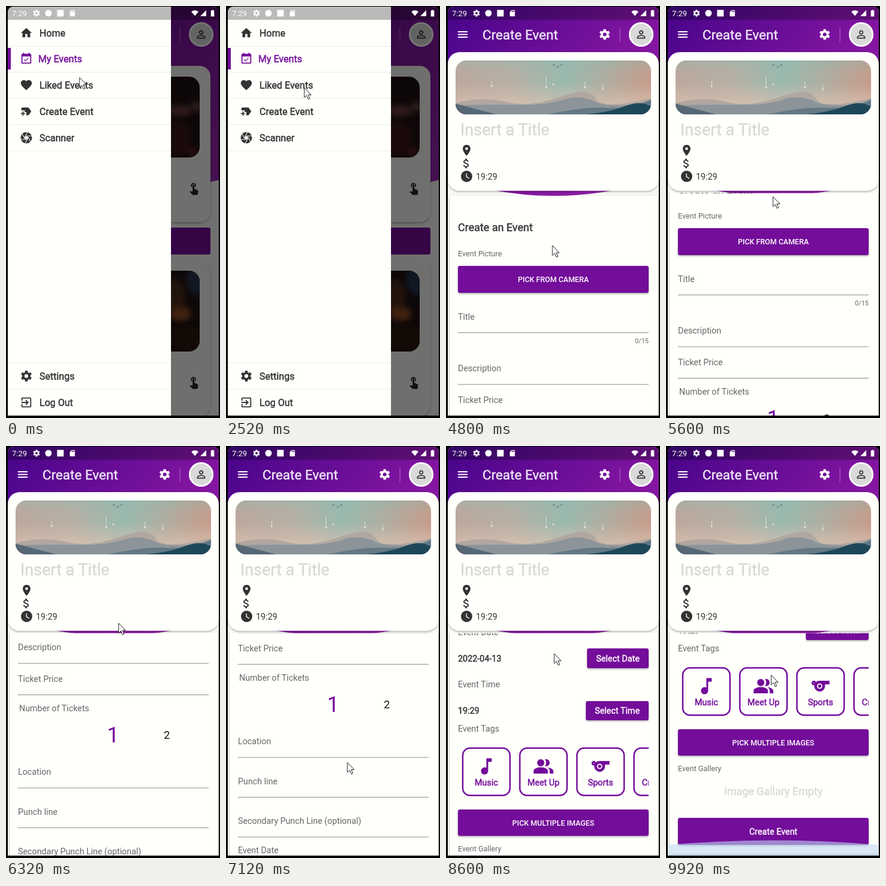
Animation, 358 px wide and 688 px high, one loop 10000 ms. Source, as an HTML page:

```html
<!DOCTYPE html>
<html lang="en">
<head>
<meta charset="utf-8">
<title>Create Event</title>
<style>
html, body { margin: 0; width: 100%; height: 100%; overflow: hidden; background: #000; }
svg { display: block; width: 358px; height: 688px; font-family: Roboto, Arial, sans-serif; }
.b { stroke-width: .45px; }
.m { font-weight: 500; }
</style>
</head>
<body>
<script>
const WHITE = '#fffffc', PURPLE = '#730b9a', DARK = '#333', GREY = '#666', PALE = '#d8d9d5';

const ICONS = {
  home: 'M10 20v-6h4v6h5v-8h3L12 3 2 12h3v8z',
  event: 'M16.5 11L15.5 10l-4.9 4.9-2.1-2.1-1.1 1 3.2 3.2zM19 3h-1V1h-2v2H8V1H6v2H5c-1.1 0-2 .9-2 2v14c0 1.1.9 2 2 2h14c1.1 0 2-.9 2-2V5c0-1.1-.9-2-2-2zm0 16H5V8h14z',
  heart: 'M12 21.4l-1.5-1.4C5.4 15.4 2 12.3 2 8.5 2 5.4 4.4 3 7.5 3c1.7 0 3.4.8 4.5 2.1C13.1 3.8 14.8 3 16.5 3 19.6 3 22 5.4 22 8.5c0 3.8-3.4 6.9-8.5 11.5z',
  label: 'M21 12l-4.4 6.2c-.4.5-1 .8-1.6.8h-3v-6H9v-3H3V7c0-1.1.9-2 2-2h10c.7 0 1.3.3 1.6.8zM10 15H7v-3H5v3H2v2h3v3h2v-3h3z',
  exit: 'M10.1 15.6L11.5 17l5-5-5-5-1.4 1.4L12.7 11H3v2h9.7zM19 3H5c-1.1 0-2 .9-2 2v4h2V5h14v14H5v-4H3v4c0 1.1.9 2 2 2h14c1.1 0 2-.9 2-2V5c0-1.1-.9-2-2-2z',
  touch: 'M9 11.2V7.5C9 6.1 10.1 5 11.5 5S14 6.1 14 7.5v3.7c1.2-.8 2-2.2 2-3.7C16 5 14 3 11.5 3S7 5 7 7.5c0 1.6.8 2.9 2 3.7zm9.8 4.7l-4.5-2.3-.5-.1H13v-6c0-.8-.7-1.5-1.5-1.5S10 6.7 10 7.5v10.7l-3.7-.7-1.5 1.1 4.9 5c.3.3.7.4 1.1.4h6.8c.7 0 1.3-.5 1.4-1.3l.8-5.2c0-.8-.4-1.4-1-1.6z',
  person: 'M12 5.9a2.1 2.1 0 1 1 0 4.2 2.1 2.1 0 0 1 0-4.2m0 9c3 0 6.1 1.5 6.1 2.1v1.1H5.9V17c0-.6 3.1-2.1 6.1-2.1M12 4a4 4 0 1 0 0 8 4 4 0 0 0 0-8zm0 9c-2.7 0-8 1.3-8 4v3h16v-3c0-2.7-5.3-4-8-4z',
  menu: 'M3 18h18v-2H3zm0-5h18v-2H3zm0-7v2h18V6z',
  place: 'M12 2C8.1 2 5 5.1 5 9c0 5.2 7 13 7 13s7-7.8 7-13c0-3.9-3.1-7-7-7zm0 4.5a2.5 2.5 0 1 1 0 5 2.5 2.5 0 0 1 0-5z',
  money: 'M11.8 10.9c-2.3-.6-3-1.2-3-2.1 0-1.1 1-1.9 2.7-1.9 1.8 0 2.4.9 2.5 2.1h2.2c-.1-1.7-1.1-3.3-3.2-3.8V3h-3v2.2c-1.9.4-3.5 1.7-3.5 3.6 0 2.3 1.9 3.4 4.7 4.1 2.5.6 3 1.5 3 2.4 0 .7-.5 1.8-2.7 1.8-2.1 0-2.9-.9-3-2.1H6.3c.1 2.2 1.8 3.4 3.7 3.8V21h3v-2.1c1.9-.4 3.5-1.5 3.5-3.6 0-2.8-2.4-3.8-4.7-4.4z',
  clock: 'M12 2a10 10 0 1 0 0 20 10 10 0 0 0 0-20zm4.2 14.2L11 13V7h1.5v5.2l4.5 2.7z',
  music: 'M12 3v10.6A4 4 0 1 0 14 17V7h4V3z',
  people: 'M16.7 13.1C18 14 19 15.3 19 17v3h4v-3c0-2.2-3.6-3.5-6.3-3.9zM15 12a4 4 0 1 0-1.3-7.8c.8 1.1 1.3 2.4 1.3 3.8s-.5 2.7-1.3 3.8zM9 12a4 4 0 1 0 0-8 4 4 0 0 0 0 8zm0 1c-2.7 0-8 1.3-8 4v3h16v-3c0-2.7-5.3-4-8-4z',
  whistle: 'M11.2 6c-1.7 0-3.2.7-4.3 1.7A2.5 2.5 0 1 0 5.1 10.9 6.2 6.2 0 0 0 11.7 18c2.5-.3 4.7-2.3 5.2-4.8.1-.7.1-1.4 0-2.1 0-.6.4-1.1 1-1.1H22V6zM4.5 8a.5.5 0 1 1 0 1 .5.5 0 0 1 0-1zM11 9a3 3 0 1 1 0 6 3 3 0 0 1 0-6zm0 1.2a1.8 1.8 0 1 0 0 3.6 1.8 1.8 0 0 0 0-3.6z',
  card: 'M18 2h-8L4 8v12c0 1.1.9 2 2 2h12c1.1 0 2-.9 2-2V4c0-1.1-.9-2-2-2zm-6 6h-2V4h2zm3 0h-2V4h2zm3 0h-2V4h2z',
  wifi: 'M12 21L0 7Q12-2 24 7z',
  signal: 'M2 22h20V2z',
  battery: 'M7 4h3V2h4v2h3v18H7z'
};

const rect = (x, y, w, h, fill, more = '') =>
  `<rect x="${x}" y="${y}" width="${w}" height="${h}" fill="${fill}" ${more}/>`;
const path = (d, fill, more = '') => `<path d="${d}" fill="${fill}" ${more}/>`;
const text = (x, y, size, str, fill = GREY, cls = '', anchor = 'start') =>
  `<text x="${x}" y="${y}" font-size="${size}" fill="${fill}" class="${cls}" text-anchor="${anchor}"` +
  `${cls == 'b' ? ` stroke="${fill}"` : ''}>${str}</text>`;
const at = (cx, cy, scale, body) =>
  `<g transform="translate(${cx} ${cy}) scale(${scale}) translate(-12 -12)">${body}</g>`;
const icon = (name, cx, cy, fill, scale = .92) =>
  at(cx, cy, scale, path(ICONS[name], fill, 'fill-rule="evenodd"'));
const spokes = (d, stroke, width) => [0, 1, 2, 3, 4, 5].map(k =>
  `<path d="${d}" stroke="${stroke}" stroke-width="${width}" transform="rotate(${k * 60} 12 12)"/>`).join('');
const gear = (cx, cy, fill, scale) => at(cx, cy, scale,
  `<circle cx="12" cy="12" r="5.4" fill="none" stroke="${fill}" stroke-width="4"/>` + spokes('M12 6V2.2', fill, 4.8));
const aperture = (cx, cy) => at(cx, cy, .95,
  `<circle cx="12" cy="12" r="10" fill="${DARK}"/>` +
  path('M9.3 10.4L12 9l2.7 1.4v3.2L12 15l-2.7-1.4z', WHITE) + spokes('M9.2 10.6L14.9.7', WHITE, 1.1));
const button = (x, y, w, h, label, size, cls) =>
  rect(x, y, w, h, PURPLE, 'rx="3" filter="url(#low)"') +
  text(x + w / 2, y + h / 2 + size * .36, size, label, '#fff', cls, 'middle');
const line = y => rect(20, y - .5, 319, 1, '#8b8b89');

function statusBar() {
  return rect(0, 0, 358, 23, '#000', 'opacity=".27"') + text(10, 17, 13, '7:29', '#fff') +
    gear(51, 12, '#fff', .58) + '<circle cx="71" cy="12" r="5.5" fill="#fff"/>' +
    rect(85.5, 6.5, 11, 11, '#fff') + icon('card', 111, 12, '#fff', .53) +
    icon('wifi', 316, 12, '#fff', .5) + icon('signal', 330, 12, '#fff', .5) + icon('battery', 345.5, 12, '#fff', .56);
}

const barEnd = () => rect(290.5, 36, 1, 24, '#fff', 'opacity=".4"') +
  '<circle cx="326.5" cy="47.5" r="19.2" fill="#d9d9d9" stroke="#fff" stroke-width="2.8"/>' +
  icon('person', 326.5, 47.5, DARK, .88);

function eventsPage() {
  const card = (y, spots) => rect(16, y, 326, 261, '#f3f3f1', 'rx="18" filter="url(#low)"') +
    `<g clip-path="url(#photo)" transform="translate(0 ${y - 100})">` + rect(34, 118, 290, 135, '#1c1012') +
    spots.map(([x, cy, rx, ry, c]) =>
      `<ellipse cx="${x}" cy="${cy}" rx="${rx}" ry="${ry}" fill="${c}" filter="url(#soft)"/>`).join('') +
    '</g>' + icon('touch', 314, y + 204, '#222', .95);
  return rect(0, 0, 358, 688, '#f6f6f4') + path('M0 0H358V290Q310 303 180 317 60 317 0 300z', 'url(#bar)') + barEnd() +
    card(100, [[290, 175, 22, 9, '#6b3b3b'], [318, 168, 8, 8, '#6d4746'], [285, 220, 26, 30, '#3a1713'],
      [312, 244, 8, 8, '#5a2420']]) +
    rect(16, 370, 326, 45, PURPLE, 'rx="3"') +
    card(424, [[320, 135, 18, 24, '#25364d'], [282, 160, 18, 28, '#4c2a1c'], [292, 190, 18, 12, '#8c4a22'],
      [304, 230, 40, 20, '#2c1411']]);
}

function drawer() {
  const item = (y, label, pic) => pic + text(56, y + 6, 16.1, label, DARK, 'b');
  return rect(0, 0, 276, 688, WHITE) +
    [67, 110, 153.5, 197.5, 241.5, 595.5, 639.5].map(y => rect(3, y, 273, 1, '#e9eae6')).join('') +
    rect(3, 70, 5, 36, PURPLE) +
    item(45, 'Home', icon('home', 34, 45, DARK)) +
    icon('event', 34, 88, PURPLE) + text(54, 94, 16.1, 'My Events', PURPLE, 'b') +
    item(131.5, 'Liked Events', icon('heart', 34, 132, DARK)) +
    item(175.5, 'Create Event', icon('label', 34, 176, DARK)) +
    item(219.5, 'Scanner', aperture(34, 220)) +
    item(618, 'Settings', gear(34, 618, DARK, .92)) +
    item(662, 'Log Out', icon('exit', 34, 662, DARK));
}

function landscape() {
  const ray = (x, y, h) => rect(x, y, 1, h, '#fff', 'opacity=".55"') +
    `<circle cx="${x + .5}" cy="${y + h}" r="1.3" fill="#fff" opacity=".8"/>`;
  return '<g clip-path="url(#banner)">' + rect(16, 91, 327, 90, 'url(#sky)') + rect(16, 91, 327, 90, 'url(#haze)') +
    path('M16 162Q60 150 100 160T190 152 250 154 343 154V181H16z', '#b0a7a1') +
    path('M16 166Q70 164 120 165T200 155Q225 148 250 160T343 160V181H16z', '#8c9499') +
    path('M16 163Q50 172 84 181H16z', '#566775') +
    path('M170 181Q230 168 270 170T343 156V181z', '#637884') +
    path('M235 181Q275 177 300 167T343 168V181z', '#1d4859') +
    ray(76, 125, 9) + ray(167, 118, 18) + ray(179, 129, 2) + ray(232, 126, 10) + ray(262, 132, 7) +
    path('M178 98l2 1 2-1M185 101l2 1 2-1M191 98l2 1 2-1', 'none', 'stroke="#456" stroke-width=".8"') + '</g>';
}

function form() {
  const field = (y, label, lineY, x = 20) => text(x, y, 14.3, label) + (lineY ? line(lineY) : '');
  const tag = (x, label, name) =>
    rect(x, 1188.5, 79, 79, 'none', `rx="12" stroke="${PURPLE}" stroke-width="2.5"`) +
    (name ? icon(name, x + 39.5, 1219, PURPLE, 1.5) : '') +
    text(x + 39.5, 1251, 14.4, label, PURPLE, 'b', 'middle');
  return rect(6, 317, 348, 1182, WHITE, 'filter="url(#low)"') +
    text(20, 376, 18, 'Create an Event', DARK, 'b') + text(20, 418, 12.6, 'Event Picture') +
    button(20, 434, 319, 45, 'PICK FROM CAMERA', 12.5, 'm') +
    field(524, 'Title', 545.5) + text(339, 563, 11, '0/15', GREY, '', 'end') +
    field(610, 'Description', 632) + field(663, 'Ticket Price', 684.5) +
    field(712, 'Number of Tickets', 0, 22) +
    text(179, 763.5, 36, '1', PURPLE, '', 'middle') + text(269, 758, 18, '2', '#111', '', 'middle') +
    field(818, 'Location', 840) + field(885, 'Punch line', 906.5) +
    field(951, 'Secondary Punch Line (optional)', 973) +
    field(1000, 'Event Date') + text(20, 1043.5, 14.4, '2022-04-13', DARK, 'b') +
    button(236, 1022, 103, 33, 'Select Date', 14.4, 'b') +
    field(1087, 'Event Time') + text(20, 1130.5, 14.4, '19:29', DARK, 'b') +
    button(234, 1110, 105, 32, 'Select Time', 14.4, 'b') + field(1161, 'Event Tags') +
    '<g clip-path="url(#tags)">' + tag(28, 'Music', 'music') + tag(123.5, 'Meet Up', 'people') +
    tag(219, 'Sports', 'whistle') + tag(314.5, 'Creative') + '</g>' +
    button(20, 1291, 319, 44, 'PICK MULTIPLE IMAGES', 12.5, 'm') + text(20, 1360.5, 12.6, 'Event Gallery') +
    text(179.5, 1401, 18, 'Image Gallary Empty', PALE, 'b', 'middle') +
    button(20, 1439, 319, 45, 'Create Event', 14.4, 'b');
}

function createPage() {
  return rect(0, 0, 358, 688, '#f8f8f5') + rect(0, 0, 358, 130, 'url(#bar)') +
    icon('menu', 28, 47.5, '#fff', .9) + text(61, 55.5, 22.55, 'Create Event', '#f1e6f6', 'b') +
    gear(265.5, 47.5, '#fff', .9) + barEnd() +
    path('M76 307Q180 327 284 307z', 'url(#bar)') +
    `<g clip-path="url(#view)"><g id="form">${form()}</g></g>` +
    rect(3, 77, 353, 231.5, WHITE, 'rx="20" filter="url(#low)"') + landscape() +
    text(24, 215.5, 27, 'Insert a Title', PALE, 'b') +
    icon('place', 34.5, 241, DARK, .92) + icon('money', 34, 263, DARK, .9) + icon('clock', 34.5, 284.5, DARK, .95) +
    text(50, 289.5, 14.4, '19:29', DARK) +
    path('M5 684V666Q180 651 355 666V684z', '#bfd9f3', 'id="glow"');
}

const clip = (id, body) => `<clipPath id="${id}">${body}</clipPath>`;
const stops = list => list.map(([o, c, a = 1]) => `<stop offset="${o}" stop-color="${c}" stop-opacity="${a}"/>`).join('');

document.body.innerHTML = `<svg viewBox="0 0 358 688"><defs>
  <linearGradient id="bar" gradientUnits="userSpaceOnUse" x2="358" y2="317">
    ${stops([[0, '#45048a'], [.57, '#80149f'], [1, '#9c27b0']])}</linearGradient>
  <linearGradient id="sky">${stops([[0, '#b9a49b'], [.3, '#b3aea3'], [.55, '#92b9ae'], [.75, '#a9aca0'], [1, '#c59786']])}</linearGradient>
  <linearGradient id="haze" x2="0" y2="1">${stops([[0, '#8fb8b0', .35], [.4, '#d5bfae', .1], [.8, '#dcc3b2', .75]])}</linearGradient>
  <filter id="low" x="-10%" y="-10%" width="120%" height="125%">
    <feDropShadow dx="0" dy="1.5" stdDeviation="1.5" flood-opacity=".35"/></filter>
  <filter id="soft" x="-50%" y="-50%" width="200%" height="200%"><feGaussianBlur stdDeviation="5"/></filter>
  ${clip('screen', '<path d="M3 684V11Q3 1 13 1H346Q356 1 356 11V684z"/>')}
  ${clip('view', rect(3, 312.5, 353, 372, '#000'))}
  ${clip('tags', rect(20, 1180, 319, 100, '#000'))}
  ${clip('photo', rect(34, 118, 290, 135, '#000', 'rx="18"'))}
  ${clip('banner', rect(16, 91, 327, 90, '#000', 'rx="18"'))}
  </defs>
  ${rect(0, 0, 358, 688, '#000')}
  <g clip-path="url(#screen)">
    <g id="events">${eventsPage()}${rect(0, 0, 358, 688, '#000', 'opacity=".54"')}${drawer()}</g>
    <g id="create">${createPage()}</g>
    ${statusBar()}
  </g>
  <path id="cursor" d="M0 0V16.5l3.9-3.6 2.7 6.4 2.6-1.1-2.7-6.2H11.5z" fill="#fff" stroke="#222"/>
</svg>`;

// Rows of time followed by values, eased between rows.
const POINTER = [[0, 123, 119.5], [2200, 130, 134], [2520, 131, 136.5], [3200, 147, 173], [3320, 149, 174],
  [3720, 167, 222.5], [4500, 178, 400], [5200, 178, 400], [5600, 179, 318.5], [5900, 182, 250], [6300, 188, 290],
  [7120, 203, 528.5], [7320, 202, 528], [7600, 190, 360], [8000, 184, 487.5], [8300, 184, 487],
  [8700, 180, 300], [9300, 178, 460], [9600, 177, 450], [9920, 176, 382.5]];
const SCROLL = [[5250, 0], [5600, 63], [5900, 150], [6500, 320], [7350, 320], [7600, 470], [8000, 569],
  [8350, 569], [8700, 730], [9100, 818]];
const FADE = [[3320, 0], [3620, 1]];
const GLOW = [[9650, 0], [9920, .6]];

function sample(rows, t) {
  const i = rows.findIndex(r => r[0] > t);
  if (i == 0) return rows[0].slice(1);
  if (i < 0) return rows[rows.length - 1].slice(1);
  const a = rows[i - 1], b = rows[i], u = (t - a[0]) / (b[0] - a[0]);
  return a.slice(1).map((v, k) => v + (b[k + 1] - v) * u);
}

const [events, create, formEl, glow, cursor] =
  ['events', 'create', 'form', 'glow', 'cursor'].map(id => document.getElementById(id));

function draw() {
  const ms = performance.now() % 10000, rest = ms % 200;
  const t = ms - rest + (rest >= 120 ? 120 : 0); // the screen refreshes in 120 and 80 ms steps
  const fade = sample(FADE, t)[0];
  create.setAttribute('opacity', fade);
  events.setAttribute('display', fade < 1 ? 'inline' : 'none');
  formEl.setAttribute('transform', `translate(0 ${-sample(SCROLL, t)[0]})`);
  glow.setAttribute('opacity', sample(GLOW, t)[0]);
  cursor.setAttribute('transform', `translate(${sample(POINTER, t)})`);
  requestAnimationFrame(draw);
}
draw();
</script>
</body>
</html>
```
